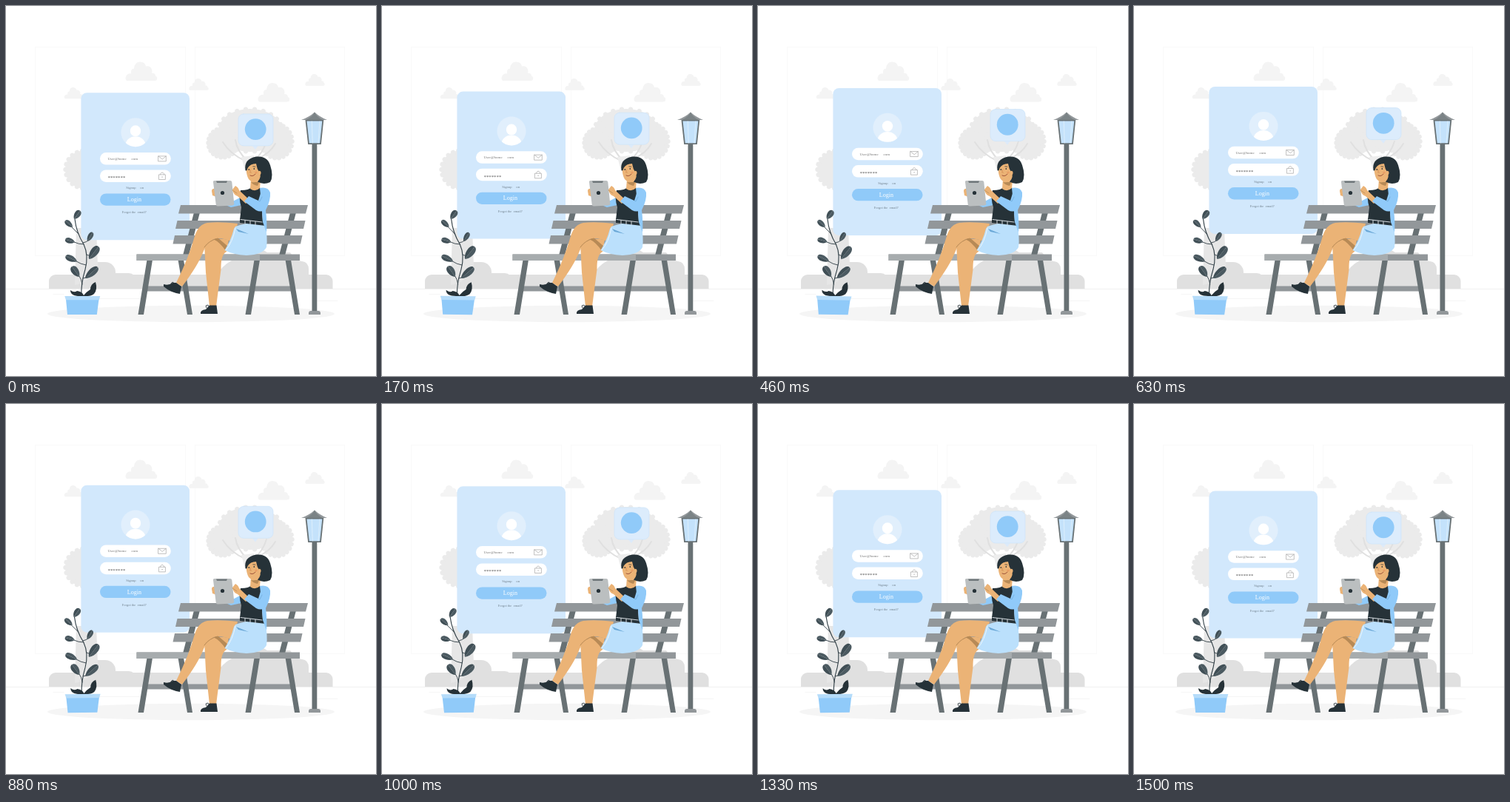
These frames come from a looping animation (500x500 px, 1.54 s). An HTML page with a canvas:

```html
<!DOCTYPE html>
<html lang="en">
<head>
<meta charset="utf-8">
<title>Login on a park bench</title>
<style>
html, body { margin: 0; width: 100%; height: 100%; overflow: hidden; background: #fff; }
canvas { display: block; width: 500px; height: 500px; }
</style>
</head>
<body>
<canvas id="stage" width="500" height="500"></canvas>
<script>
const ctx = document.getElementById('stage').getContext('2d');
const LOOP = 1540;
const BLUE = '#90caf9', PALE = '#d2e8fc', INK = '#263238', SKIN = '#ebb376';
const STEEL = '#92979a', DARK_STEEL = '#687174', SHADE = '#b78a56';

function shape(d, color) {
  ctx.fillStyle = color;
  ctx.fill(new Path2D(d));
}

function line(d, color, width = 1) {
  ctx.strokeStyle = color;
  ctx.lineWidth = width;
  ctx.lineCap = 'round';
  ctx.stroke(new Path2D(d));
}

function oval(x, y, rx, ry, color, turn = 0) {
  ctx.fillStyle = color;
  ctx.beginPath();
  ctx.ellipse(x, y, rx, ry, turn, 0, Math.PI * 2);
  ctx.fill();
}

function box(x, y, w, h, r, color) {
  ctx.fillStyle = color;
  ctx.beginPath();
  ctx.roundRect(x, y, w, h, r);
  ctx.fill();
}

function label(text, x, y, size, color) {
  ctx.font = `${size}px "Liberation Serif", serif`;
  ctx.fillStyle = color;
  ctx.fillText(text, x, y);
}

function cloud(x, y, scale) {
  ctx.save();
  ctx.translate(x, y);
  ctx.scale(scale, scale);
  shape('M2 25.5Q-1 22 2 18Q5 15 8 16Q7 9 12 9Q13 0 20 0Q27 0 28 6Q34 5 36 10Q37 13 36 15Q41 15 41 19Q44 20 43 23Q43 25.5 40 25.5Z', '#f4f4f4');
  ctx.restore();
}

// An ellipse edged with small round tufts of leaves.
function foliage(x, y, rx, ry) {
  const color = '#ebebeb', tufts = 22;
  oval(x, y, rx, ry, color);
  for (let i = 0; i < tufts; i++) {
    const a = i / tufts * Math.PI * 2;
    oval(x + (rx - 1) * Math.cos(a), y + (ry - 1) * Math.sin(a), 3.7, 3.2, color, a);
  }
}

function backdrop() {
  ctx.strokeStyle = '#f9f9f9';
  ctx.lineWidth = 1;
  ctx.strokeRect(39.5, 55.5, 203, 282);
  ctx.strokeRect(255.5, 55.5, 202, 282);
  cloud(161, 75.5, 1);
  cloud(340, 104, 1);
  cloud(78.5, 110, 0.6);
  cloud(247, 98, 0.62);
  cloud(404, 92, 0.62);

  box(58, 363, 383.5, 20, [9, 9, 0, 0], '#e0e0e0');
  box(108, 346, 40, 37, [12, 14, 0, 0], '#e0e0e0');
  box(138, 361, 38, 22, [0, 10, 0, 0], '#e0e0e0');
  shape('M284 366Q291 351 305 344Q309 329 324 328Q342 325 353 333H384Q391 345 400 345Q409 346 409 356V366Z', '#e0e0e0');
  shape('M95 300H122L124 352Q114 374 93 377Z', '#e6e6e6');

  foliage(107, 221, 27, 26);
  foliage(330, 168, 43, 29);
  foliage(293, 185, 20, 20);
  foliage(366, 183, 21, 23);
  foliage(331, 186, 25, 8);
  line('M323 209Q304 201 293 184M326 209Q312 196 310 181M335 209Q347 199 352 183M340 206Q356 200 364 186', '#e0e0e0', 2);
  shape('M318 204L335 202L333 222H323Z', '#ededed');
}

function ground() {
  line('M0 382.5H500', '#f0f0f0');
  line('M123 395.5H182M421 398.5H448M64 389.5H78', '#f5f5f5');
  oval(250, 416, 194, 11.2, '#f5f5f5');
}

function lamp() {
  box(413.5, 186, 6.8, 228, 0, DARK_STEEL);
  box(409, 412, 16, 5, [3, 3, 0, 0], STEEL);
  shape('M404.5 154H429.3L425.8 187H408.2Z', DARK_STEEL);
  shape('M406.5 155.5H427.3L424.2 185.3H409.8Z', '#c4e2fb');
  line('M413.3 156L414.3 185M424 156L422 185', '#e3f1fd', 0.8);
  shape('M399 154Q410 150 417 143.5Q424 150 434 154Z', STEEL);
  shape('M405 154Q414 150 417 143.5Q420 150 428 154Z', '#7b8386');
}

function panel() {
  box(101.4, 117.2, 146.6, 199, 8, PALE);

  ctx.save();
  ctx.beginPath();
  ctx.arc(175, 170.6, 19.5, 0, Math.PI * 2);
  ctx.clip();
  box(155, 150, 40, 41, 0, '#e1effc');
  oval(175, 188, 13.5, 11.8, '#fff');
  oval(175, 168.6, 7.2, 7.4, '#fff');
  ctx.restore();

  box(127, 198, 95.8, 16.5, 8.2, '#fff');
  box(127, 221.3, 95.8, 16.5, 8.2, '#fff');
  label('User@home', 137.5, 208, 5, '#777');
  label('com', 169.5, 208, 5, '#777');
  line('M206 202.8H216.3V209.8H206ZM206 202.8L211.2 207L216.3 202.8', '#b0b0b0', 0.8);
  label('*******', 137.5, 234.2, 6.8, '#555');
  line('M206.8 227.8H215.4V234.4H206.8ZM208.7 227.6V226.5Q211.1 223.3 213.5 226.5V227.6M210.5 231H211.8', '#b0b0b0', 0.8);
  label('Signup', 162.3, 247.2, 4.7, '#70808d');
  label('on', 181.3, 247.2, 4.7, '#70808d');
  box(127, 253.3, 95.5, 16.3, 8.1, BLUE);
  label('Login', 163.8, 264.1, 8, '#fff');
  label('Forgot the', 156.8, 280.3, 4.5, '#70808d');
  label('email?', 177.7, 280.3, 4.5, '#70808d');
}

function bubble() {
  shape('M331 187H342L337 194Z', '#dceafa');
  box(314, 145.8, 47, 43, 7, '#dcecfc');
  ctx.strokeStyle = '#cde4fa';
  ctx.lineWidth = 0.7;
  ctx.stroke();
  oval(337.2, 166.5, 14.4, 14.4, BLUE);
}

function bench() {
  shape('M254 279H262L247 337H239ZM384 279H392L377 337H369Z', DARK_STEEL);
  shape('M236 269H408L405 280.5H233ZM231.5 290H404.5L402 301H229ZM228 310H400.5L398 321.5H225.5Z', STEEL);
  box(190, 378.5, 197, 7, 0, STEEL);
  shape('M190.5 343H198L186 417H178.5ZM232.5 343H240L252 417H245ZM335.5 343H343L331 417H323.5ZM377.5 343H385L397 417H390Z', DARK_STEEL);
  box(176.5, 335.5, 220.5, 8.5, 0, STEEL);
  box(176.5, 335.5, 166.5, 8.5, 0, '#a7acae');
}

function leaf(x, y, tipX, tipY, width) {
  const dx = tipX - x, dy = tipY - y;
  const k = width / Math.hypot(dx, dy);
  const half = s => `M${x} ${y}C${x + dx * .3 - s * dy * k} ${y + dy * .3 + s * dx * k} ` +
    `${x + dx - s * dy * k} ${y + dy + s * dx * k} ${tipX} ${tipY}Z`;
  shape(half(1), '#4b5a61');
  shape(half(-1), '#404f56');
}

function plant() {
  line('M102 392Q101 376 107 356Q112 337 105 322Q95 306 93 288', '#303e45', 1.1);
  line('M98 308L89 299M105 322Q98 322 92 319M109 336L114 338M104 320Q109 319 111 317M108 350Q101 349 95 345M104 368Q108 368 110 365M103 376Q102 369 99 365', '#303e45', 0.9);
  leaf(92, 288, 100, 276.5, 5.5);
  leaf(90, 299, 80, 290, 4.7);
  leaf(93, 319, 80, 315.5, 5);
  leaf(110, 318, 117, 306, 4.5);
  leaf(112, 342, 125, 325, 7);
  leaf(96, 345, 80.5, 338, 5.5);
  leaf(107, 368, 124, 353, 6.5);
  leaf(99, 366, 89, 352, 6.5);
  shape('M103 392Q87 393 87 384Q92 388 96 385Q103 386 105 391Q109 386 114 383Q114 376 121 373Q124 383 119 389Q114 393 103 392Z', INK);
  shape('M81 396.5H125.5L122.8 417H83Z', BLUE);
  shape('M79.3 392H127.2L125.8 397.3H81Z', '#b5dcfa');
}

function legs() {
  shape('M268 321Q280 312 301 316L298 332Q290 336 290.5 356L284 406H275L270 360Z', SKIN);
  shape('M280 315Q289 319 297 331L300 325L286 313Z', SHADE);
  shape('M313 294Q288 291 272 293Q260 295 255 311Q247 340 230 374L238 379Q260 350 267 331Q272 319 281 315Q290 312 307 319Z', SKIN);
  line('M268 326Q274 317 286 314', SHADE, 1);
  shape('M213 376Q220 378 225 374L230 374L237 379L235 389Q222 387 213 379Z', INK);
  shape('M263 416Q262 411 270 410L275 404.5H284.5L286 416Z', INK);
  line('M223 375L225 373L228 375M271 408L270 405L273 404L275 407', INK, 0.8);
}

function body() {
  shape('M310 298Q333 290 350 295Q354 312 352 326Q347 336 325 337Q307 336 295.5 330Q304 317 308 301Z', '#bbe0fc');
  line('M310 300Q306 320 297 330', '#edf6fd', 1);
  shape('M311 301L328 308L314 305Z', '#6ba8d7');
  shape('M297 269L316 259L318 269L304 272Z', BLUE);
  shape('M317 249Q329 249 331 245L345 246Q350 259 346 276L347 292L316 289L318 272Q314 260 317 249Z', INK);
  shape('M316 287L351 292V297L316 293Z', INK);
  line('M317 288.5L346 292M323 289.5V294M330 290.5V295M337 291.5V296', '#e8eef2', 0.9);
  shape('M343 246Q354 244 357 252Q358 262 351 276Q353 292 352 306L347 292Q345 264 343 246Z', BLUE);

  shape('M331 234L344 236L343 246Q337 252 330 247Z', SKIN);
  shape('M331 238Q339 239 343 236L340 243Q334 242 331 238Z', SHADE);
  shape('M325 214Q334 205 345 212L347 232L340 237.5Q329 239 326.5 231Q323.5 222 325 214Z', SKIN);
  shape('M323.5 222Q321 207 338 203.6Q353 202 357 215Q362 230 357 238Q348 242 340 237.5Q346 231 342.5 225Q339 220 338 213Q330 213 326.5 219Q325.5 224 323.5 222Z', INK);
  oval(342.5, 225.5, 2, 2.8, SKIN);
  oval(328.3, 221, 0.8, 1.1, INK);
  oval(335.3, 220, 0.8, 1.1, INK);
  line('M333.8 216.8L336.8 217.2', INK, 0.7);
  line('M330.5 221L329.7 225H331.5', '#ce8850', 0.7);
  line('M330 229Q334 231 337 227', '#9b4f37', 1);
  oval(338, 225, 1.8, 1.5, '#e99e65');
}

function tabletAndArm() {
  shape('M284 247Q278 246 278 250L279 256L285 258Z', SKIN);
  shape('M280 238Q279.5 236 282 236H303Q305 236 305.3 238L308.3 267Q308.5 269 306 269.5L286 270.5Q284 270.5 283.7 268Z', '#bbbfc0');
  shape('M284 236.5H299L298 239H285Z', '#71797c');
  oval(292.5, 252.5, 2.6, 2.6, INK);
  shape('M306 248L310 243Q314 245 315 249L329 262L324 267L313 257Q307 255 306 248Z', SKIN);
  line('M306 249L312 253', SHADE, 0.7);
  shape('M322 264L328 257L341 263L345 250Q351 244 356 252Q358 260 349 276Q344 279 338 276Z', BLUE);
  line('M341 263L343 264L346 258', '#6ba8d7', 0.7);
}

function scene(time) {
  const rise = 1 - Math.abs(((time + 50) % LOOP) / (LOOP / 2) - 1);
  const eased = 0.75 * (0.5 - 0.5 * Math.cos(Math.PI * rise)) + 0.25 * rise;
  const floatY = 0.3 - 9 * eased;
  const sway = Math.sin(time / LOOP * Math.PI * 2) * Math.PI / 180;

  ctx.fillStyle = '#fff';
  ctx.fillRect(0, 0, 500, 500);
  backdrop();
  ground();
  lamp();

  ctx.save();
  ctx.translate(0, floatY);
  panel();
  bubble();
  ctx.restore();

  bench();
  ctx.save();
  ctx.translate(103, 346.5);
  ctx.rotate(sway);
  ctx.translate(-103, -346.5);
  plant();
  ctx.restore();

  legs();
  body();
  tabletAndArm();
}

const start = performance.now();
function tick() {
  scene((performance.now() - start) % LOOP);
  requestAnimationFrame(tick);
}
tick();
</script>
</body>
</html>
```
